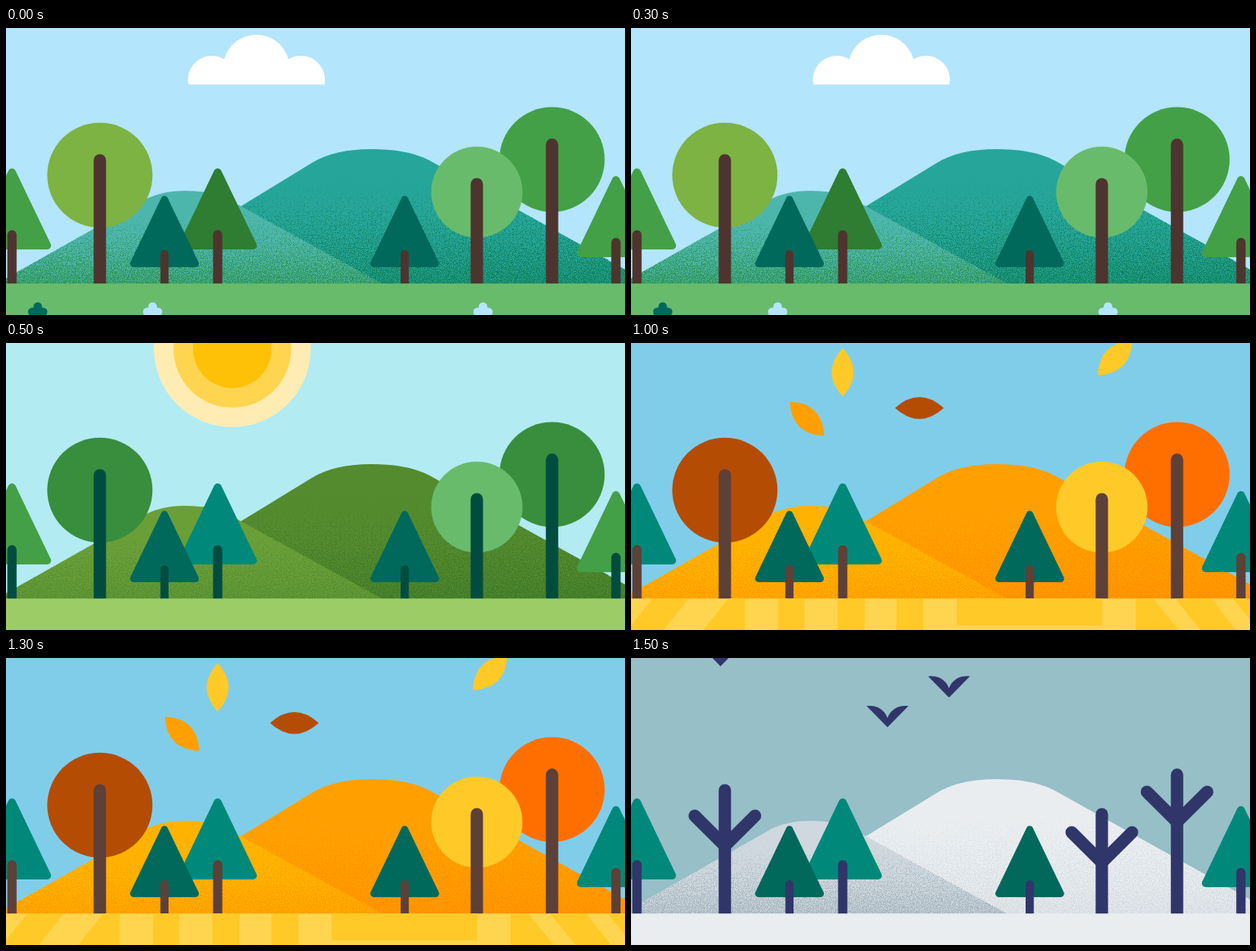
Write an HTML page without scripts that moves like this. It is 800 by 372 pixels and loops after 2 s.

```html
<!DOCTYPE html>
<html lang="en">
<head>
<meta charset="utf-8">
<title>Four seasons</title>
<style>
  html, body { margin: 0; width: 100%; height: 100%; overflow: hidden; }
  svg { display: block; width: 100%; height: 100%; }

  .season { animation: turn 2s step-end infinite; }
  @keyframes turn {
    0% { visibility: visible; }
    25%, 100% { visibility: hidden; }
  }

  .spring {
    --sky: #b3e5fc; --ground: #69bb6c; --trunk: #4e342e;
    --far: #26a69a; --far-grain: #12835f; --near: #4db6ac; --near-grain: #2f9656;
    --crown-left: #7cb342; --crown-mid: #69bb6c; --crown-right: #43a047;
    --fir-edge: #43a047; --fir-tall: #2e7d32;
  }
  .summer {
    --sky: #b2ebf2; --ground: #9ccc65; --trunk: #004d40;
    --far: #558b2f; --far-grain: #3f7a27; --near: #6a9f38; --near-grain: #558f31;
    --crown-left: #388e3c; --crown-mid: #69bb6c; --crown-right: #388e3c;
    --fir-edge: #43a047; --fir-tall: #00897b;
    animation-delay: -1.5s;
  }
  .autumn {
    --sky: #80cdea; --ground: #ffd54f; --trunk: #5d4037;
    --far: #ffa000; --far-grain: #ff8f00; --near: #ffb300; --near-grain: #ff9c00;
    --crown-left: #b54c04; --crown-mid: #ffca28; --crown-right: #ff6f00;
    --fir-edge: #00897b; --fir-tall: #00897b;
    animation-delay: -1s;
  }
  .winter {
    --sky: #96bfc7; --ground: #e9edf0; --trunk: #303669;
    --far: #e9edf0; --far-grain: #d6dce1; --near: #cfd8de; --near-grain: #a8b7c0;
    --crown-left: none; --crown-mid: none; --crown-right: none;
    --fir-edge: #00897b; --fir-tall: #00897b;
    animation-delay: -.5s;
  }

  .trunk { fill: none; stroke: var(--trunk); stroke-width: 16; stroke-linecap: round; }
  .fir-edge { color: var(--fir-edge); }
  .fir-tall { color: var(--fir-tall); }
  .fir-small { color: #00695c; }
  mask { mask-type: alpha; }
</style>
</head>
<body>
<svg viewBox="0 0 800 372" preserveAspectRatio="none">
  <defs>
    <linearGradient id="fade" x2="0" y2="1">
      <stop offset="0" stop-opacity="0"/>
      <stop offset="1" stop-opacity=".85"/>
    </linearGradient>
    <!-- Speckles grow denser where the fade is more opaque -->
    <filter id="speckle" x="0" y="0" width="1" height="1">
      <feOffset result="density"/>
      <feTurbulence type="fractalNoise" baseFrequency=".83" seed="4"/>
      <feColorMatrix values="0 0 0 0 0  0 0 0 0 0  0 0 0 0 0  0 0 0 3 -1" result="noise"/>
      <feComposite in="density" in2="noise" operator="arithmetic" k2="3" k3="3" k4="-3"/>
    </filter>
    <mask id="far-mask" maskUnits="userSpaceOnUse" x="0" y="0" width="800" height="372">
      <rect y="195" width="800" height="137" fill="url(#fade)" filter="url(#speckle)"/>
    </mask>
    <mask id="near-mask" maskUnits="userSpaceOnUse" x="0" y="0" width="800" height="372">
      <rect y="235" width="800" height="97" fill="url(#fade)" filter="url(#speckle)"/>
    </mask>

    <path id="far-hill" d="M139 332L395 175Q424 157 472 157T548 172L834 332Z"/>
    <path id="near-hill" d="M-13 332L178 223.500Q199 211 232 211Q268 211 290 223.500L487 332Z"/>

    <g id="fir">
      <path d="M0 5L45.500 100H-45.500Z" fill="currentColor" stroke="currentColor" stroke-width="10" stroke-linejoin="round"/>
      <path class="trunk" d="M0 86V160" style="stroke-width:12"/>
    </g>
    <path id="flower" d="M-7 0H7M0-7V8" fill="none" stroke="currentColor" stroke-width="11" stroke-linecap="round"/>
    <path id="leaf" d="M0-31.500Q28.500 0 0 31.500Q-28.500 0 0-31.500"/>
    <path id="bird" d="M-27-13.500C-14-15-4-9 0 2C4-9 14-15 27-13.500L0 14Z"/>
    <path id="branches" class="trunk" d="M-39 0L0 39L39 0"/>

    <g id="scene">
      <rect width="800" height="372" fill="var(--sky)"/>
      <use href="#far-hill" fill="var(--far)"/>
      <use href="#far-hill" fill="var(--far-grain)" mask="url(#far-mask)"/>
      <use href="#near-hill" fill="var(--near)"/>
      <use href="#near-hill" fill="var(--near-grain)" mask="url(#near-mask)"/>

      <circle cx="121.300" cy="190.700" r="68" fill="var(--crown-left)"/>
      <circle cx="705.700" cy="170.500" r="68" fill="var(--crown-right)"/>
      <circle cx="608.500" cy="212.700" r="59" fill="var(--crown-mid)"/>
      <path class="trunk" d="M121.300 171.500V345M608.500 202.500V345M705.700 151.300V345"/>

      <use href="#fir" class="fir-edge" transform="translate(7.700 182)"/>
      <use href="#fir" class="fir-tall" transform="translate(273.600 182)"/>
      <use href="#fir" class="fir-edge" transform="translate(788.300 192)"/>
      <use href="#fir" class="fir-small" transform="translate(204.800 217.500)scale(.88)"/>
      <use href="#fir" class="fir-small" transform="translate(515.300 217.500)scale(.88)"/>
      <rect y="331.200" width="800" height="41" fill="var(--ground)"/>
    </g>
  </defs>

  <g class="season spring">
    <use href="#scene"/>
    <path d="M235.700 73.300A31 31 0 0 1 282 40.500A43 43 0 0 1 365 40.500A31 31 0 0 1 411.500 73.300Z" fill="#fff"/>
    <use href="#flower" x="41" y="368" color="#00695c"/>
    <use href="#flower" x="189.500" y="368" color="#b3e5fc"/>
    <use href="#flower" x="616.500" y="368" color="#b3e5fc"/>
  </g>

  <g class="season summer">
    <use href="#scene"/>
    <g transform="translate(292.500 7.700)">
      <circle r="101.300" fill="#ffecb3"/>
      <circle r="76" fill="#ffd54f"/>
      <circle r="50.700" fill="#ffc107"/>
    </g>
  </g>

  <g class="season autumn">
    <use href="#scene"/>
    <g fill="#ffca28">
      <path d="M28 331H75L42 372H-5ZM126 331H147V372H93ZM190 331h34v41h-34zM267 331h35v41h-35zM343 331h35v41h-35zM421 331H609V366H421ZM652 331H675L708 372H652ZM703 331H750L782 372H736ZM778 331H800V359Z"/>
      <use href="#leaf" transform="translate(273.500 38)"/>
      <use href="#leaf" transform="translate(625.500 19.500)rotate(45)"/>
    </g>
    <use href="#leaf" transform="translate(227.500 98.300)rotate(-45)" fill="#ffa000"/>
    <use href="#leaf" transform="translate(372.700 84.300)rotate(90)" fill="#b54c04"/>
  </g>

  <g class="season winter">
    <use href="#scene"/>
    <use href="#branches" x="121.300" y="204.500"/>
    <use href="#branches" x="608.500" y="226"/>
    <use href="#branches" x="705.700" y="173.500"/>
    <g fill="#303669">
      <use href="#bird" x="411" y="37.300"/>
      <use href="#bird" x="331.500" y="75.700"/>
      <use href="#bird" x="115.700" y="-3.300"/>
    </g>
  </g>
</svg>
</body>
</html>
```
